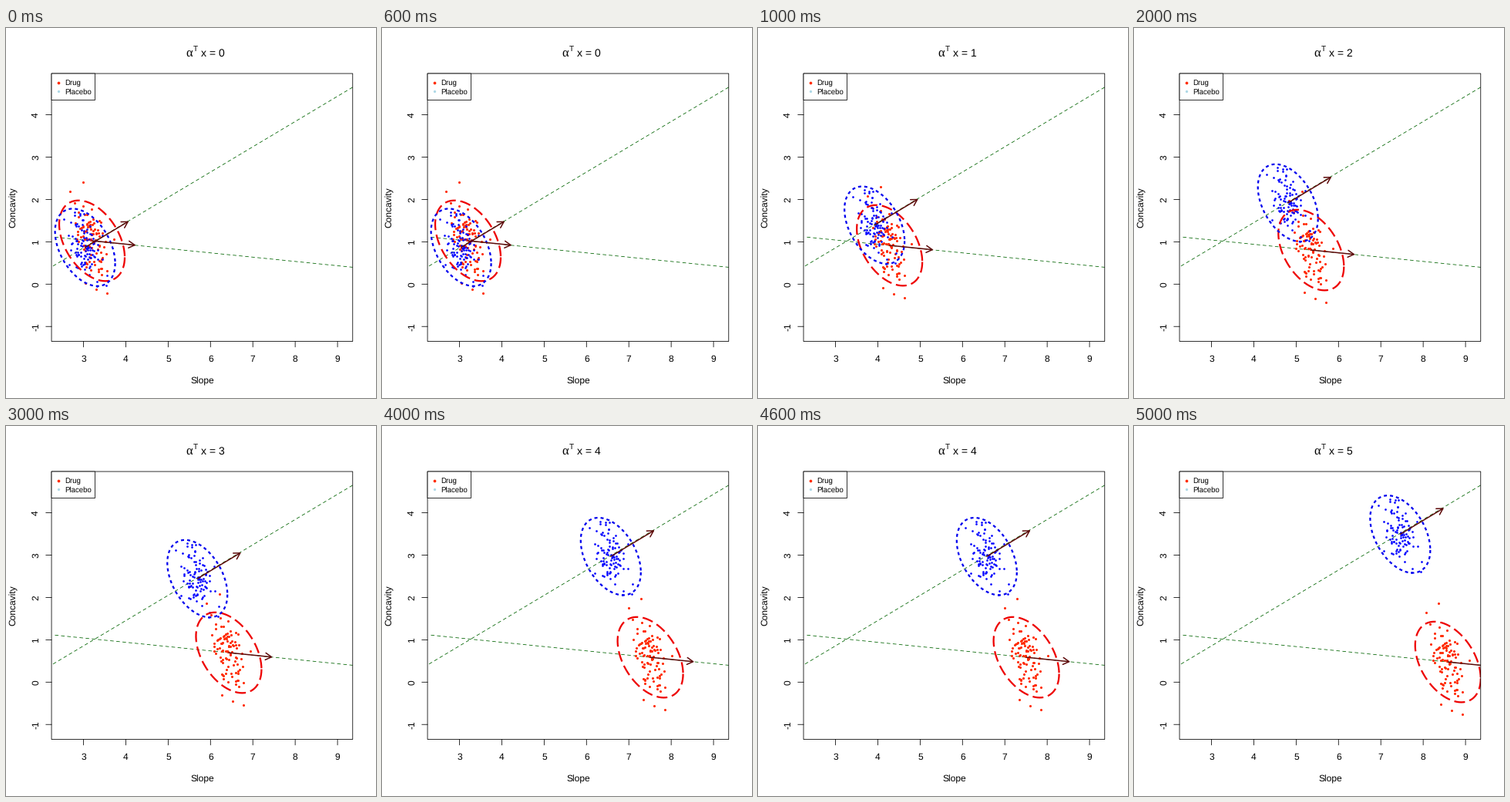
A matplotlib script that plays this animation: 480 px wide and 480 px high, repeating every 6 s.

```python
import numpy as np
import matplotlib.pyplot as plt
from matplotlib.animation import FuncAnimation
from matplotlib.patches import Rectangle

plt.rcParams.update({"font.family": "Liberation Sans", "text.hinting": "none",
                     "lines.scale_dashes": False, "path.snap": False})
STEPS, STEP_MS = 6, 1000
LEFT, TOP, RIGHT, BOTTOM = 59.04, 59.04, 449.76, 406.56
UNIT = 54.93                    # pixels per data unit on both axes
X3, Y0 = 100.5, 332.3           # pixel places of Slope = 3 and Concavity = 0
RED, BLUE = "#ff2a00", "#0000ff"

# One pixel per point; y runs downwards.
fig = plt.figure(figsize=(480 / 72, 480 / 72), dpi=72, facecolor="white")
ax = fig.add_axes([0, 0, 1, 1])
ax.set(xlim=(0, 480), ylim=(480, 0))
ax.axis("off")


def box(w, h, fill, z):
    return ax.add_patch(Rectangle((LEFT, TOP), w, h, fc=fill, ec="black",
                                  lw=0.8, zorder=z))


def label(x, y, s, size=12, **kw):
    return ax.text(x, y, s, fontsize=size, va="baseline",
                   rotation_mode="anchor", zorder=10, **kw)


frame = box(RIGHT - LEFT, BOTTOM - TOP, "none", 8)


def line(x, y, **kw):
    art, = ax.plot(x, y, **kw)
    art.set_clip_path(frame)
    return art


def cloud(seed, n, sx, sy, rho, outer):
    """Correlated normal offsets within two deviations, plus outer points."""
    rng = np.random.default_rng(seed)
    u, v = rng.standard_normal((2, 3 * n))
    keep = np.hypot(u, v) < 2
    u, v = u[keep][:n], v[keep][:n]
    core = np.column_stack([sx * u, sy * (rho * u + np.sqrt(1 - rho**2) * v)])
    return np.vstack([core, outer])


def ellipse(a, b, rho):
    t = np.linspace(0, 2 * np.pi, 241)
    return np.column_stack([
        a * np.cos(t), b * (rho * np.cos(t) + np.sqrt(1 - rho**2) * np.sin(t))])


class Group:
    """Points, ellipse and arrow that shift together by one step per frame."""

    def __init__(self, start, step, slope, dots, ring, color, edge,
                 lw, dash, size, z):
        self.start, self.step = np.array(start), np.array(step)
        tip = UNIT * np.array([1.01, slope])
        turn = np.arctan2(tip[1], tip[0])
        left, right = (tip - 9 * np.array([np.cos(turn + s), np.sin(turn + s)])
                       for s in (-np.pi / 6, np.pi / 6))
        self.shapes = [dots, ring, np.array([(0, 0), tip]),
                       np.array([left, tip, right])]
        arrow = dict(color="#5c0808", lw=1.5, zorder=6, solid_capstyle="round")
        self.arts = [
            line([], [], ls="none", marker="o", ms=size, mew=0, color=color,
                 zorder=z),
            line([], [], color=edge, lw=lw, ls=(0, dash),
                 dash_capstyle="butt", zorder=5),
            line([], [], **arrow), line([], [], **arrow)]

    def place(self, i):
        c = self.start + i * self.step
        for art, pts in zip(self.arts, self.shapes):
            art.set_data(*(pts + c).T)


# Axes
tick = dict(color="black", lw=0.8)
for v in range(3, 10):
    x = X3 + (v - 3) * UNIT
    ax.plot([x, x], [BOTTOM, BOTTOM + 7.2], **tick)
    label(x, 433, str(v), ha="center")
for v in range(-1, 5):
    y = Y0 - v * UNIT
    ax.plot([LEFT - 7.2, LEFT], [y, y], **tick)
    label(42, y, str(v), ha="center", rotation=90)
label(254.4, 462, "Slope", ha="center")
label(12.5, 232.8, "Concavity", ha="center", rotation=90)

# Title
label(233.3, 37, "α", 16.5, family="Liberation Serif")
label(243.2, 30.5, "T", 10)
title = label(252.6, 37, "", 14)

# Legend
box(56.4, 34.5, "white", 9)
for y, name, color, ms in ((70.5, "Drug", RED, 3.7),
                           (82, "Placebo", "#add8e6", 3.3)):
    ax.plot(67.5, y, "o", ms=ms, mew=0, color=color, zorder=10)
    label(76, y + 3.6, name, 9.6)

# Directions
for x, y in (((63.5, RIGHT), (271.3, 310.4)), ((61, RIGHT), (308.8, 76.8))):
    line(x, y, color="#006400", lw=0.8, ls=(0, (4.6, 3.4)),
         dash_capstyle="butt", zorder=1)

drug = cloud(4, 92, 11.5, 25, 0.42,
             [(-12, -76), (-28.5, -64), (-23, -49), (28, -2),
              (-9, 55), (5, 63), (19, 68)])
placebo = cloud(9, 92, 11.5, 24, 0.45,
                [(-28, -37), (-2, -44), (22, -16), (-21, 22),
                 (28, 36), (27, 49), (15, 50)])

groups = [
    Group((111.5, 276), (59.15, 6.02), 0.102, drug, ellipse(42.5, 52.3, 0.41),
          RED, "#ee0000", 2.25, (14, 6), 3.1, 3),
    Group((102.6, 284.6), (48.55, -28.85), -0.605, placebo,
          ellipse(39, 50.2, 0.41), BLUE, "#0000ee", 2.25, (4, 4), 2.7, 4)]


def draw(i):
    title.set_text(f"x = {i}")
    for g in groups:
        g.place(i)
    return []


anim = FuncAnimation(fig, draw, frames=STEPS, interval=STEP_MS,
                     init_func=lambda: draw(0), repeat=True, repeat_delay=0)
plt.show()
```
